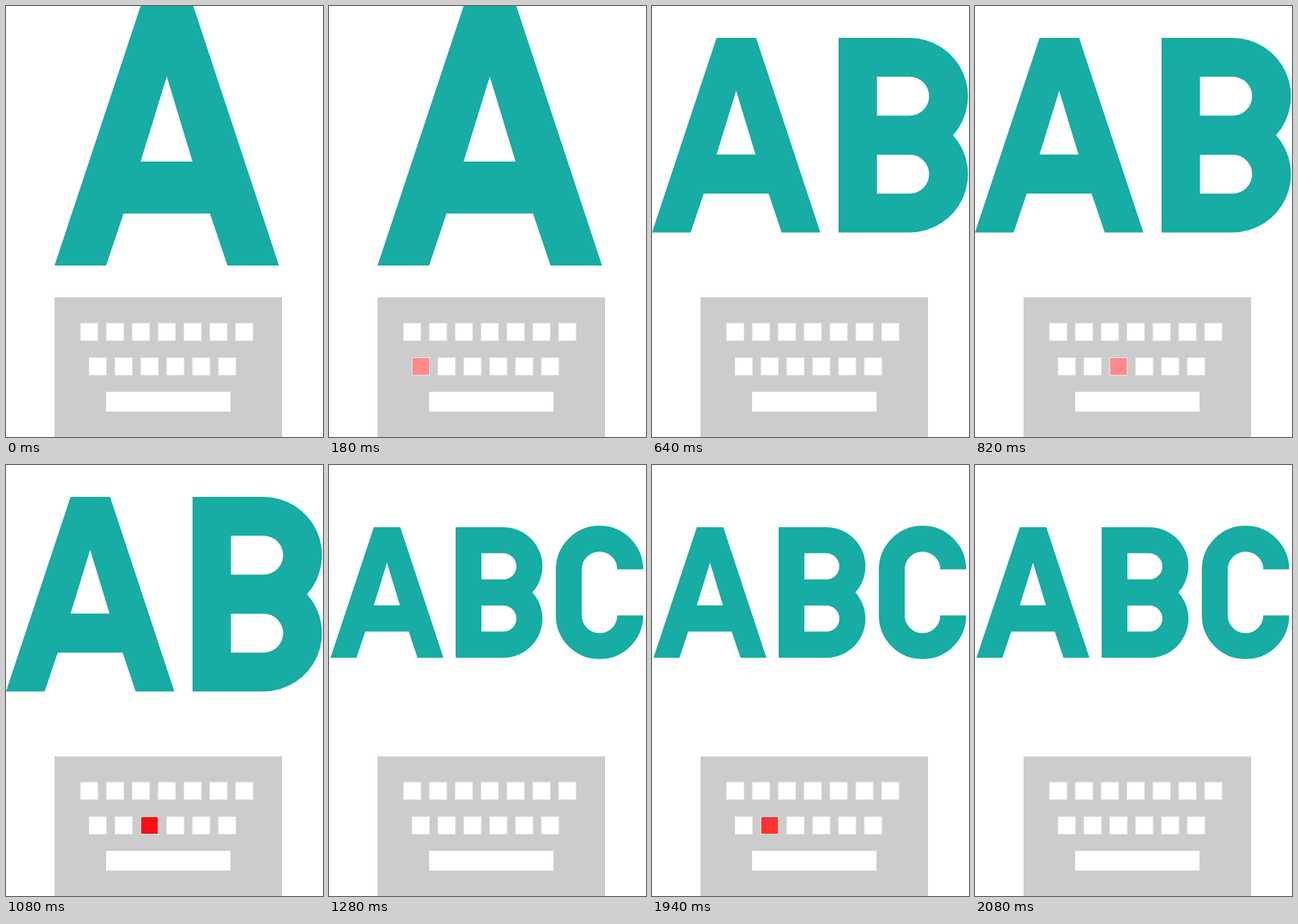
These frames come from a looping animation (418 px wide and 568 px high, 2.66 s). An HTML page:

```html
<!DOCTYPE html>
<html lang="en">
<head>
<meta charset="utf-8">
<title>Typing ABC</title>
<style>
  html, body { margin: 0; width: 100%; height: 100%; overflow: hidden; background: #fff; }
  svg { display: block; }
</style>
</head>
<body>
<svg width="418" height="568" viewBox="0 0 418 568">
  <defs>
    <!-- letters are 342 units high -->
    <path id="A" fill-rule="evenodd" d="M113.5 0H183L296 342H228L205 273.5H91L68 342H0Z M148 93L182 205H113.5Z"/>
    <path id="B" fill-rule="evenodd" d="M0 0H125A102.5 102.5 0 0 1 201.25 171A102.5 102.5 0 0 1 125 342H0Z
      M67.5 68.3V136.7H125A34.2 34.2 0 0 0 125 68.3Z M67.5 205.2V273.6H125A34.2 34.2 0 0 0 125 205.2Z"/>
  </defs>
  <g fill="#17aca4">
    <g class="word"><use href="#A" x="64"/></g>
    <g class="word">
      <use href="#A" transform="translate(0 42) scale(.75)"/>
      <use href="#B" transform="translate(246 42) scale(.75)"/>
    </g>
    <g class="word">
      <use href="#A" transform="translate(2 82) scale(.503)"/>
      <use href="#B" transform="translate(167 82) scale(.503)"/>
      <path fill="none" stroke="#17aca4" stroke-width="34.2"
        d="M397.2 137.6A40.5 40.5 0 0 0 316.2 137.6V198.2A40.5 40.5 0 0 0 397.2 198.2"/>
    </g>
  </g>
  <path fill="#ccc" d="M64 384h300v184h-300z"/>
  <g id="keys"></g>
  <path fill="#fff" d="M132 508.5h164v26h-164z"/>
</svg>
<script>
const LOOP = 2660;
const PITCH = 34.1;

// [ms since the fade began, amount of red]
const FADE_IN = [[0, .07], [40, .2], [80, .33], [120, .46], [160, .58], [200, .7],
  [240, .8], [300, .87], [340, .9], [360, .92], [380, .95]];
const FADE_OUT = [[0, .81], [20, .68], [40, .54], [60, .41], [80, .27], [100, .14], [140, 0]];

const shift = (steps, start) => steps.map(([at, level]) => [start + at, level]);

const keys = document.getElementById("keys");

function addRect(x, y, size, fill) {
  const rect = document.createElementNS("http://www.w3.org/2000/svg", "rect");
  const attrs = { x, y, width: size, height: size, fill };
  for (const name in attrs) rect.setAttribute(name, attrs[name]);
  return keys.appendChild(rect);
}

function addRow(x, y, count) {
  return Array.from({ length: count }, (_, i) => {
    const left = x + PITCH * i;
    addRect(left, y, 24, "#e6e6e6");
    addRect(left + 1, y + 1, 22, "#fff");
    const glow = addRect(left + 1, y + 1, 22, "#f00");
    glow.style.opacity = 0;
    return glow;
  });
}

addRow(97.7, 417.5, 7);
const row = addRow(109, 463, 6);

const presses = [
  { key: row[0], steps: [...shift(FADE_IN, 60), [640, 0]] },
  { key: row[2], steps: [...shift(FADE_IN, 700), [1280, 0]] },
  { key: row[1], steps: [...shift(FADE_IN, 1340), ...shift(FADE_OUT, 1940)] }
];
const words = document.querySelectorAll(".word");
const wordSteps = [[0, 0], [640, 1], [1280, 2]];

// value of the last step already reached
const valueAt = (steps, t) => steps.reduce((v, [at, next]) => t >= at ? next : v, 0);

function draw() {
  const t = performance.now() % LOOP;
  const shown = valueAt(wordSteps, t);
  words.forEach((word, i) => { word.style.display = i === shown ? "" : "none"; });
  for (const { key, steps } of presses) key.style.opacity = valueAt(steps, t);
  requestAnimationFrame(draw);
}
draw();
</script>
</body>
</html>
```
